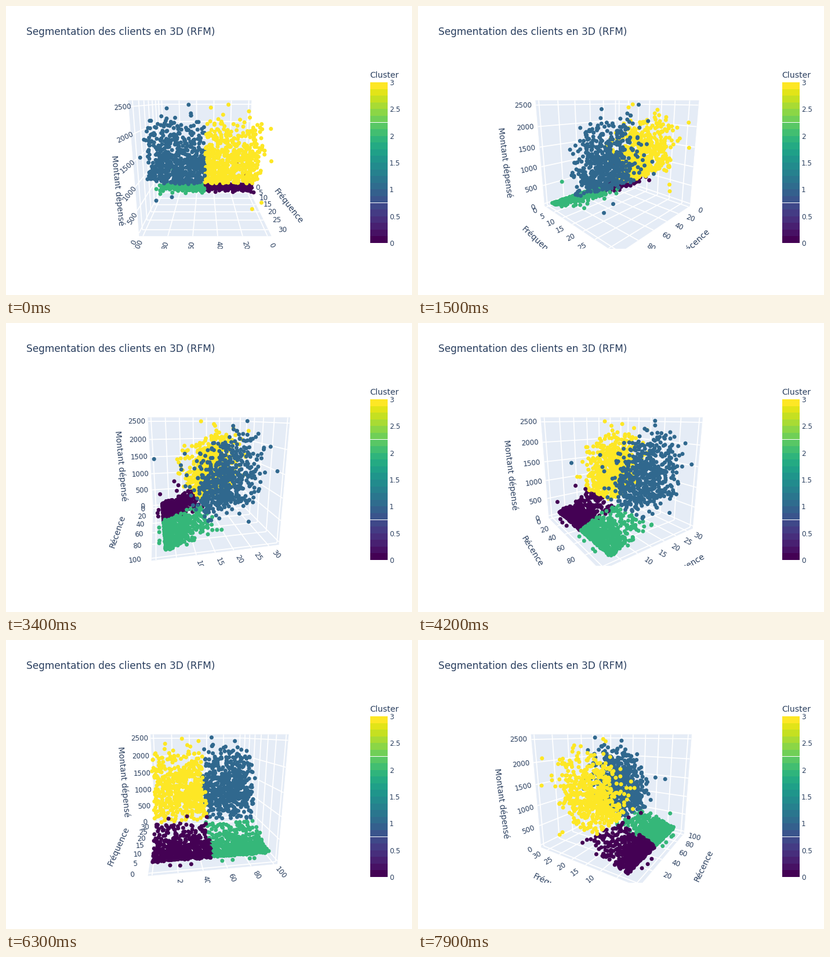
A matplotlib script for the animation above (8 s loop, 700 by 500 pixels).

```python
import numpy as np
import matplotlib.pyplot as plt
from matplotlib.animation import FuncAnimation
from matplotlib.collections import LineCollection, PolyCollection
from matplotlib.patches import Rectangle

W, H, DPI = 700, 500, 100
PX = 72 / DPI
FRAMES, INTERVAL, STEP = 80, 100, 3
INK, WALL = "#2a3f5f", "#e5ecf6"
COLORS = np.array([[68, 1, 84], [48, 104, 142], [53, 183, 121], [253, 231, 37]]) / 255

# Scene viewport in pixels and the orbiting camera
LEFT, RIGHT, TOP, BOTTOM = 80, 607, 100, 420
CX, CY = (LEFT + RIGHT) / 2, (TOP + BOTTOM) / 2
FOCAL = (BOTTOM - TOP) / 2 / np.tan(np.pi / 8)
RADIUS, EYE_Z = 2.0, 0.5
PITCH = np.arctan2(EYE_Z, RADIUS)
TICK_GAP, TITLE_GAP = 0.115, 0.31

RANGES = np.array([[-3, 103], [-1.05, 32.9], [-65, 2605]])
TICKS = [np.arange(0, 101, 20), np.arange(0, 31, 5), np.arange(0, 2501, 500)]
NAMES = ["Récence", "Fréquence", "Montant dépensé"]

plt.rcParams["font.family"] = "DejaVu Sans"
rng = np.random.default_rng(12)


def unit(values, axis):
    lo, hi = RANGES[axis]
    return (np.asarray(values, float) - lo) / (hi - lo) - 0.5


UNIT_TICKS = [unit(t, i) for i, t in enumerate(TICKS)]


def make_customers():
    n = 1150
    freq = 2.4 + rng.exponential(3.9, n)
    spend = freq * rng.uniform(17, 37, n)
    low = np.column_stack([rng.uniform(0, 100, n), freq, spend])
    low = low[spend + 50 * freq < 1230]

    freq = np.clip(rng.normal(19.5, 4.4, n), 8, 31)
    spend = 34 * freq + 1560 * rng.beta(1.0, 1.7, n)
    high = np.column_stack([rng.uniform(0, 100, n), freq, spend])
    high = high[(spend + 50 * freq > 1230) & (spend < 2430)]

    # recency, frequency, spend of the isolated customers
    odd_low = [(88, 2.7, 582), (2, 1.8, 390), (30, 8, 850), (14, 7, 850),
               (47, 7, 840), (14, 1, 20), (22, 0.6, 15), (31, 0.8, 15),
               (57, 1, 20), (66, 1, 20), (81, 1, 20), (85, 0.9, 20)]
    odd_high = [(51, 0.6, 1676), (93.5, 25.1, 424), (9.7, 27.5, 314),
                (0.2, 25.4, 386), (0, 31.5, 1478), (62.7, 27.5, 2525),
                (28.6, 16, 2510), (99, 31.5, 1550), (83, 21, 2440),
                (45, 19, 2450), (13, 22, 2380), (80, 24, 470)]
    low, high = np.vstack([low, odd_low]), np.vstack([high, odd_high])
    cluster = np.concatenate([np.where(low[:, 0] < 50, 0, 2),
                              np.where(high[:, 0] < 50, 3, 1)])
    data = np.vstack([low, high])
    return np.column_stack([unit(data[:, i], i) for i in range(3)]), cluster


def project(points, theta):
    """Screen positions and depths of cube points."""
    x, y, z = np.asarray(points, float).T
    c, s = np.cos(theta), np.sin(theta)
    ahead = RADIUS - (x * c + y * s)
    side = y * c - x * s
    rise = z - EYE_Z
    depth = ahead * np.cos(PITCH) - rise * np.sin(PITCH)
    up = ahead * np.sin(PITCH) + rise * np.cos(PITCH)
    return np.column_stack([CX + FOCAL * side / depth, CY - FOCAL * up / depth]), depth


def slope(a, b):
    """Readable text rotation along the screen direction a to b."""
    dx, dy = b - a
    if dx < 0:
        dx, dy = -dx, -dy
    return -np.degrees(np.arctan2(dy, dx))


def place(text, pos, angle):
    text.set_position(pos)
    text.set_rotation(angle)


def face(axis, at):
    """Corner loop and grid segments of one cube side."""
    a, b = [i for i in range(3) if i != axis]
    corners = np.full((4, 3), at)
    corners[:, a] = [-0.5, 0.5, 0.5, -0.5]
    corners[:, b] = [-0.5, -0.5, 0.5, 0.5]
    lines = []
    for i, j in ((a, b), (b, a)):
        for t in UNIT_TICKS[i]:
            seg = np.full((2, 3), at)
            seg[:, i] = t
            seg[:, j] = -0.5, 0.5
            lines.append(seg)
    return corners, lines


fig = plt.figure(figsize=(W / DPI, H / DPI), dpi=DPI, facecolor="white")
page = fig.add_axes([0, 0, 1, 1], xlim=(0, W), ylim=(H, 0))
scene = fig.add_axes([LEFT / W, 1 - BOTTOM / H, (RIGHT - LEFT) / W, (BOTTOM - TOP) / H],
                     xlim=(LEFT, RIGHT), ylim=(BOTTOM, TOP))
for ax in (page, scene):
    ax.axis("off")

page.text(35, 50, "Segmentation des clients en 3D (RFM)", size=17 * PX, color=INK)
page.text(627, 124, "Cluster", size=14 * PX, color=INK)

BANDS, BAR_TOP, BAR_END = 24, 132, 410
band = (BAR_END - BAR_TOP) / BANDS
for i in range(BANDS):
    page.add_patch(Rectangle((628, BAR_END - (i + 1) * band), 30, band, lw=0, antialiased=False,
                             color=plt.cm.viridis(i / (BANDS - 1))))
for v in np.arange(0, 3.1, 0.5):
    page.text(661, BAR_END - v / 3 * (BAR_END - BAR_TOP), f"{v:g}",
              size=12 * PX, color=INK, va="center_baseline")

walls = scene.add_collection(PolyCollection([], facecolors=WALL, edgecolors=WALL, linewidths=0.3))
grid = scene.add_collection(LineCollection([], colors="white", linewidths=1.8 * PX))
points, cluster = make_customers()
dots = scene.scatter(*np.zeros((2, len(points))), s=(7 * PX) ** 2, linewidths=0, zorder=3)


def scene_text(label, size):
    return scene.text(0, 0, label, size=size * PX, color=INK, ha="center", va="center",
                      clip_on=True, zorder=2.5)


labels = [[scene_text(str(t), 12) for t in ticks] for ticks in TICKS]
titles = [scene_text(name, 14) for name in NAMES]


def axis_layout(theta):
    """For each axis: a point on its edge and the outward direction."""
    near = np.sign([np.cos(theta), np.sin(theta)])
    ends = np.array([[near[0], -near[1], 0], [-near[0], near[1], 0]]) / 2
    xy, _ = project(ends, theta)
    k = int(np.argmin(xy[:, 0]))
    out_x, out_y = np.array([near[0], 0, 0]), np.array([0, near[1], 0])
    return near, [(np.array([0, near[1] / 2, -0.5]), out_y),
                  (np.array([near[0] / 2, 0, -0.5]), out_x),
                  (ends[k], out_x if k == 0 else out_y)]


def update(n):
    theta = np.radians(90.001 - STEP * n)
    near, layout = axis_layout(theta)

    sides = [face(0, -near[0] / 2), face(1, -near[1] / 2), face(2, -0.5)]
    walls.set_verts([project(c, theta)[0] for c, _ in sides])
    grid.set_segments([project(s, theta)[0] for _, lines in sides for s in lines])

    for i, (base, out) in enumerate(layout):
        for t, text in zip(UNIT_TICKS[i], labels[i]):
            p = base.copy()
            p[i] = t
            (a, b), _ = project([p, p + TICK_GAP * out], theta)
            place(text, b, slope(a, b))
        mid = base + TITLE_GAP * out
        along = np.eye(3)[i] * 0.05
        (a, m, b), _ = project([mid - along, mid, mid + along], theta)
        place(titles[i], m, slope(a, b))

    xy, depth = project(points, theta)
    order = np.argsort(-depth)
    dots.set_offsets(xy[order])
    dots.set_facecolors(COLORS[cluster[order]])
    return []


anim = FuncAnimation(fig, update, frames=FRAMES, interval=INTERVAL,
                     init_func=lambda: update(0), repeat=True, repeat_delay=0)
plt.show()
```
